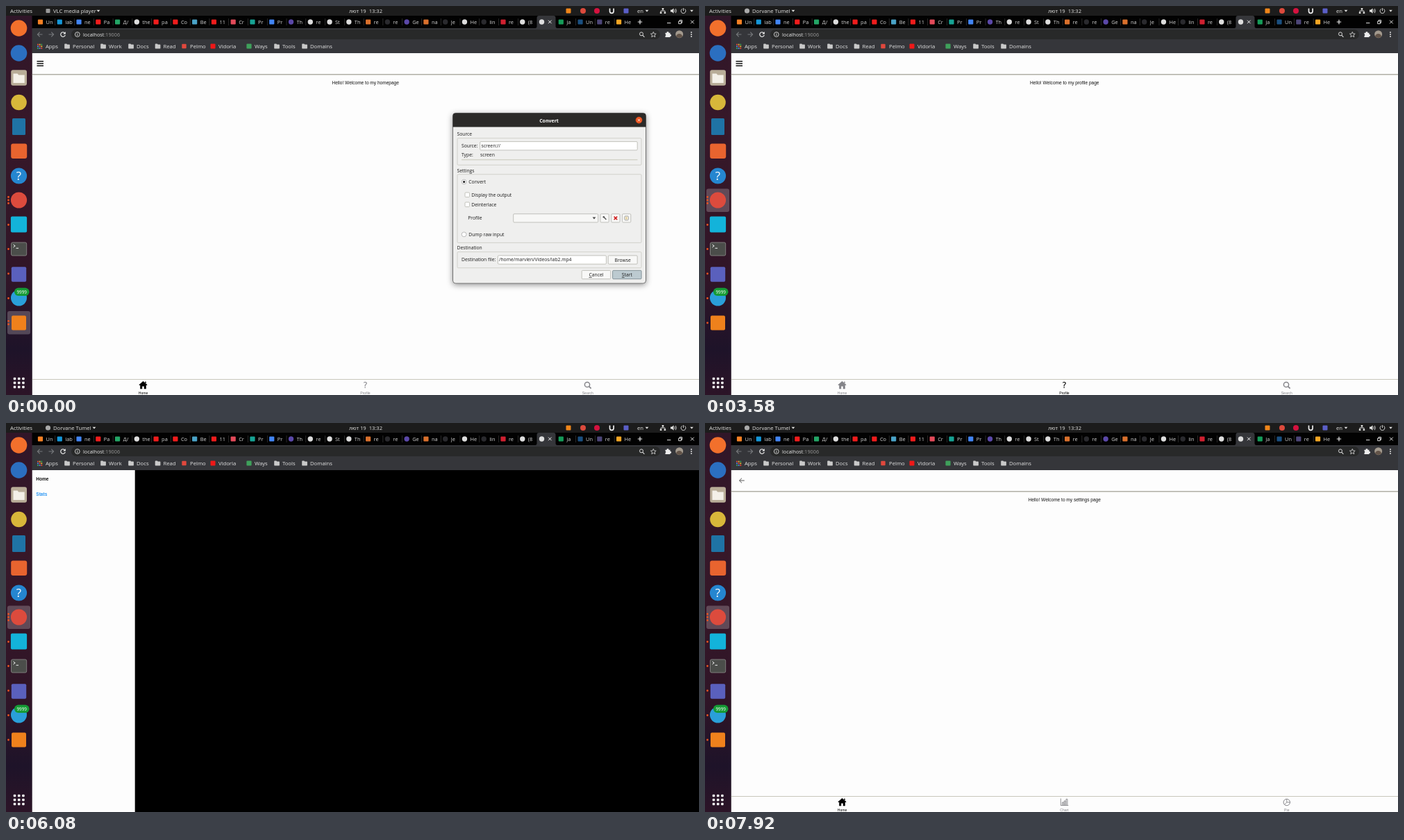
An HTML page that plays this animation: 998 px wide and 561 px high, repeating every 8000 ms.

```html
<!DOCTYPE html>
<html lang="en">
<head>
<meta charset="utf-8">
<title>Tab and drawer navigation</title>
<style>
html, body { margin: 0; width: 100%; height: 100%; overflow: hidden; background: #000; }
svg { display: block; width: 100vw; height: 100vh; }
svg svg { width: auto; height: auto; }
text { font-family: "Open Sans", "Noto Sans", sans-serif; white-space: pre; }
.web text { font-family: "Liberation Sans", Arial, sans-serif; }
</style>
</head>
<body>
<svg id="stage" viewBox="0 0 998 561" preserveAspectRatio="none"></svg>
<script>
const LOOP = 8000;
const FRAME = 1000 / 12;
const DRAWER_WIDTH = 148.2;

const rect = (x, y, w, h, fill, more = '') =>
  `<rect x="${x}" y="${y}" width="${w}" height="${h}" fill="${fill}" ${more}/>`;
const circle = (x, y, r, fill, more = '') =>
  `<circle cx="${x}" cy="${y}" r="${r}" fill="${fill}" ${more}/>`;
const line = (d, color, width = 1, more = '') =>
  `<path d="${d}" fill="none" stroke="${color}" stroke-width="${width}" ${more}/>`;
const shape = (d, fill) => `<path d="${d}" fill="${fill}"/>`;
const text = (x, y, value, size, fill, more = '') =>
  `<text x="${x}" y="${y}" font-size="${size}" fill="${fill}" ${more}>${value}</text>`;
const group = (id, body, more = '') => `<g id="${id}" ${more}>${body}</g>`;
const square = (x, y, r, fill, round = 1) =>
  rect(x - r, y - r, 2 * r, 2 * r, fill, `rx="${round}"`);
const caret = (x, y, fill) => shape(`M${x - 2.4} ${y - 1.2}h4.8l-2.4 2.8z`, fill);
const MIDDLE = 'text-anchor="middle"';
const BOLD = 'font-weight="700"';

function topBar() {
  const light = '#e4e4e2';
  return rect(0, 0, 998, 14, '#1c1c1c')
    + text(6, 9.8, 'Activities', 7.8, light)
    + group('vlcTitle', square(60.5, 7, 3, '#999') + text(68, 9.8, 'VLC media player', 7.7, light) + caret(133, 7, light))
    + group('browserTitle', circle(60.5, 7, 3.6, '#aaa') + text(68, 9.8, 'Dorvane Tumel', 7.7, light) + caret(127, 7, light))
    + text(518, 9.8, 'лют 19  13:32', 7.6, light, MIDDLE)
    + square(810, 7, 3.5, '#f0861a') + circle(831, 7, 4, '#dc4a3c') + circle(851, 7, 4, '#d5123f')
    + line('M869.5 3.5v4a2.8 2.8 0 0 0 5.6 0v-4', '#eee', 1.7) + square(893, 7, 3.5, '#5b5fc7')
    + text(909, 9.8, 'en', 7.7, light) + caret(923, 7, light)
    + line('M946 4v3M943 10V7h6v3', light, .9)
    + rect(944.7, 3, 2.6, 2.2, light) + rect(941.8, 8.7, 2.6, 2.2, light) + rect(947.6, 8.7, 2.6, 2.2, light)
    + shape('M957 5.6h2l2.5-2.4v7.6l-2.5-2.4h-2z', light) + line('M962.8 5q1.5 2 0 4M964.3 3.8q2.4 3.2 0 6.4', light, .8)
    + line('M973.8 4.2a3.4 3.4 0 1 0 3.4 0M975.5 3v4', light, .9) + caret(987.5, 7, light);
}

function tabStrip() {
  const red = '#f01c1c', docs = '#4285f4', violet = '#5b48a8', white = '#ddd', orange = '#d9702c', dark = '#2a2a2e';
  const tabs = [
    ['Un', '#f48024'], ['lab', '#1496d8'], ['ne', docs], ['Pa', red], ['Д/', '#23a566'], ['the', white], ['pa', red],
    ['Co', red], ['Be', '#4aa3c8'], ['11', red], ['Cr', '#e34a5a'], ['Pr', '#16a394'], ['Pr', docs], ['Th', violet],
    ['re', white], ['St', white], ['Th', white], ['re', orange], ['re', dark], ['Ge', violet], ['na', orange],
    ['Je', dark], ['He', white], ['lin', dark], ['re', '#d02030'], ['(8', white], ['', white],
    ['Ja', '#159b58'], ['Un', '#1a4f80'], ['re', '#4d4678'], ['He', '#f5a623'],
  ];
  const isRound = color => [white, violet, dark].includes(color);
  let out = rect(37, 14, 961, 18, '#020202')
    + '<path d="M762 32q2.5 0 2.5-3V17q0-3 3-3h21q3 0 3 3v12q0 3 2.5 3z" fill="#35363a"/>';
  tabs.forEach(([label, color], i) => {
    const x = 49.5 + i * 27.77;
    out += isRound(color) ? circle(x, 23, 3.7, color) : square(x, 23, 3.6, color);
    if (!label) return;
    out += `<svg x="${x + 8}" y="14" width="12.5" height="18" style="width:12.5px;height:18px">`
      + text(0, 11.6, label, 7.4, '#d6d6d6') + '</svg>';
    if (tabs[i + 1]?.[0]) out += rect(x + 21, 18, .6, 10, '#444');
  });
  return out + line('M781 20.6l4.6 4.6m0-4.6l-4.6 4.6', '#eee', 1)
    + line('M909.8 23h6.4M913 19.8v6.4', '#eee', 1.2)
    + line('M952 24.5h5.4M968.7 22h3.6v3.6h-3.6zM970 21.8v-1.4h3.6v3.8h-1.2M986 20.6l4.8 4.8m0-4.8l-4.8 4.8', '#ddd', 1);
}

function toolbar() {
  const folder = x => shape(`M${x - 3.8} 55.2q0-.7.7-.7h2.4l1 1h2.9q.7 0 .7.7v4.6q0 .7-.7.7h-6.3q-.7 0-.7-.7z`, '#c9c9c9');
  const label = (x, value) => text(x, 60.8, value, 7.7, '#e4e4e4');
  const folders = [[88, 'Personal'], [140, 'Work'], [180, 'Docs'], [218.5, 'Read'], [390, 'Tools'], [430, 'Domains']];
  let apps = '';
  const hues = ['#e8453c', '#f9bb2d', '#3aa757', '#4688f1'];
  for (let i = 0; i < 9; i++) apps += rect(45 + i % 3 * 2.7, 54.7 + (i / 3 | 0) * 2.7, 1.8, 1.8, hues[i % 4]);
  return rect(37, 32, 961, 36, '#35363a') + rect(94, 34, 848, 14, '#282929', 'rx="7"')
    + line('M52.5 41h-7m3.2-3.3L45.4 41l3.3 3.3M61.5 41h7m-3.2-3.3l3.3 3.3-3.3 3.3', '#77797c', 1.1)
    + line('M84.8 39.2a3.3 3.3 0 1 0 .5 2.6', '#eee', 1.2) + shape('M85.8 37v3.4h-3.4z', '#eee')
    + circle(102.8, 41, 3.4, 'none', 'stroke="#ddd" stroke-width=".9"') + line('M102.8 40.3v2.7M102.8 38.7v.9', '#ddd', .9)
    + text(111, 43.7, 'localhost<tspan fill="#9a9a9a">:19006</tspan>', 7.25, '#eee')
    + circle(915, 40.3, 2.5, 'none', 'stroke="#ddd"') + line('M916.8 42.2l2.6 2.6', '#ddd', 1.1)
    + line('M932.3 37.3l1.1 2.6 2.8.2-2.1 1.8.7 2.8-2.5-1.5-2.5 1.5.7-2.8-2.1-1.8 2.8-.2z', '#ddd', .8)
    + shape('M949.5 38.8h2.2a1.4 1.4 0 1 1 2.6 0h2.2v2.3a1.3 1.3 0 1 1 0 2.5V45h-7v-2a1.3 1.3 0 0 0 0-2.4z', '#eee')
    + circle(969.7, 40.7, 5.5, '#a39a8e') + shape('M965 44q1-4 4.6-4t4.6 4q-4.6 4.2-9.2 0z', '#625348')
    + [38, 41, 44].map(y => circle(987, y, .9, '#eee')).join('')
    + apps + label(57, 'Apps') + folders.map(([x, name]) => folder(x) + label(x + 8, name)).join('')
    + square(256.5, 58, 3.2, '#e0483d') + label(265, 'Pelmo')
    + square(298, 58, 3.5, '#f01818') + label(306, 'Vidorla')
    + square(350, 58, 3.6, '#3fa15b') + label(358, 'Ways');
}

function dock() {
  const x = 18.5;
  const dots = (...ys) => ys.map(y => circle(3.5, y, 1.4, '#e95420')).join('');
  const highlight = (id, y) => group(id, rect(2, y, 33, 33.5, '#fff', 'rx="3" opacity=".22"'));
  let grid = '';
  for (let i = 0; i < 9; i++) grid += rect(10.7 + i % 3 * 6.2, 535.7 + (i / 3 | 0) * 6, 3.6, 3.6, '#f2f2f2', 'rx="1"');
  return rect(0, 14, 37.5, 547, 'url(#dockFill)')
    + highlight('browserLit', 263.5) + highlight('vlcLit', 440)
    + circle(x, 32, 11.8, '#f2702c') + circle(x, 68, 11.8, '#2b6fc0')
    + rect(7.2, 92.3, 22.8, 22.4, '#b9ad98', 'rx="3"')
    + shape('M10.5 97.5h6l1.7 2h8.5v11.5H10.5z', '#f4f0e8')
    + circle(x, 139, 11.3, '#d8b73a')
    + rect(9, 162, 19, 24, '#1f73a5', 'rx="1.5"') + rect(7.2, 198.5, 23, 21.5, '#e8642f', 'rx="3"')
    + circle(x, 245, 11.6, '#2586d0') + text(x, 251, '?', 17, '#fff', MIDDLE)
    + circle(x, 280, 11.6, '#dc4b3d') + square(x, 315, 11.6, '#13b3da', 2)
    + rect(7.5, 341, 22.2, 19, '#4b4d4a', 'rx="2" stroke="#8f8f8c" stroke-width=".8"')
    + line('M10.5 344l2.7 2-2.7 2M14.5 349.3h3.5', '#eee', 1)
    + square(x, 387, 10.7, '#5a60bd', 2)
    + circle(x, 421, 11.5, '#2a9fd9') + rect(12, 406.5, 21.5, 11.5, '#159a35', 'rx="5.7"')
    + text(22.7, 414.6, '9999', 6.4, '#fff', MIDDLE)
    + square(x, 457, 10.5, '#ef811c', 2)
    + dots(275.5, 280, 284.5, 315.5, 350.5, 386, 421.5)
    + group('vlcTwoDots', dots(454.3, 459)) + group('vlcOneDot', dots(457)) + grid;
}

// Bottom navigation icons inherit their colour from the tab.
const icons = {
  home: x => shape(`M${x} 541l6 5.3-.8.9-.9-.7v5.7h-3v-3.7h-2.6v3.7h-3v-5.7l-.9.7-.8-.9zM${x + 2.5} 541.8h1.7v2.4l-1.7-1.4z`, 'currentColor'),
  help: x => `<text x="${x}" y="551.3" font-size="12" fill="currentColor" text-anchor="middle" style="font-family:'DejaVu Sans',sans-serif">?</text>`,
  search: x => circle(x - .8, 546, 3.6, 'none', 'stroke="currentColor" stroke-width="1.5"') + line(`M${x + 1.8} 548.6l3 3`, 'currentColor', 1.7),
  chart: x => line(`M${x - 5.2} 541.5v10h11M${x - 3} 551v-4h1.8v4M${x - .3} 551v-6h1.8v6M${x + 2.5} 551v-8.6h1.9v8.6`, 'currentColor', .9),
  pie: x => circle(x, 547, 4.7, 'none', 'stroke="currentColor"') + line(`M${x} 542.3v4.7h4.7M${x} 547l-3.3 3.3`, 'currentColor', .9),
};
const tab = (id, x, icon, label) =>
  group(id, icons[icon](x) + text(x, 559.5, label, 5.1, 'currentColor', MIDDLE));

function page() {
  const hellos = ['homepage', 'profile page', 'search page', 'settings page'];
  const drawer = rect(37.5, 68, DRAWER_WIDTH, 493, '#fdfdfd')
    + rect(37.5, 68, DRAWER_WIDTH, 24, '#f4f4f3', 'id="band"')
    + text(43.3, 83, 'Home', 6.55, '#111', BOLD) + text(43.3, 105.3, 'Stats', 6.55, '#2a96f3', BOLD + ' id="stats"');
  return rect(37.5, 68, 960.5, 493, '#fdfdfd')
    + rect(37.5, 98, 960.5, 1, '#aaa99f') + rect(37.5, 99, 960.5, 1.2, '#dededa')
    + line('M44.5 79.8h9.5m-9.5 3.2h9.5m-9.5 3.2h9.5', '#111', 1.4, 'id="menu"')
    + line('M56.8 83h-7.2m3.4-3.4L49.5 83l3.5 3.4', '#444', .9, 'id="back"')
    + hellos.map((end, i) => group('hello' + i, text(517.7, 113.2, 'Hello! Welcome to my ' + end, 6.55, '#111', MIDDLE))).join('')
    + rect(37.5, 538, 960.5, .9, '#c2c1b4')
    + tab('homeTab', 197.5, 'home', 'Home')
    + group('mainTabs', tab('profileTab', 517.5, 'help', 'Profile') + tab('searchTab', 837.8, 'search', 'Search'))
    + group('statsTabs', tab('chartTab', 517.5, 'chart', 'Chart') + tab('pieTab', 837.8, 'pie', 'Pie'), 'color="#85858a"')
    + rect(37.5, 68, 960.5, 493, '#000', 'id="shade"') + group('drawer', drawer);
}

function dialog() {
  const ink = '#1c1c1c';
  const label = (x, y, value, more) => text(x, y, value, 6.75, ink, more);
  const frame = (x, y, w, h, fill = 'none', edge = '#c9c9c2', r = 1.2) =>
    rect(x, y, w, h, fill, `rx="${r}" stroke="${edge}" stroke-width=".8"`);
  const field = (x, y, w) => frame(x, y, w, 12.3, '#fff', '#b5b5ad');
  const button = (x, y, w, value, fill = '#f8f8f7', edge = '#b3b3ac') =>
    frame(x, y, w, 12.3, fill, edge) + label(x + w / 2, y + 8.6, value, MIDDLE);
  const under = (first, rest) => `<tspan text-decoration="underline">${first}</tspan>${rest}`;
  const radio = y => circle(659.6, y, 3.4, '#fff', 'stroke="#aaa" stroke-width=".8"');
  const body = rect(643.5, 154.5, 278, 245.5, '#efefee', 'rx="4" stroke="#555" stroke-width=".8"');
  return `<g filter="url(#shadow)">${body}</g>`
    + shape('M643.5 174.5v-16q0-4 4-4h270q4 0 4 4v16z', '#2b2a28')
    + text(782, 167.5, 'Convert', 7, '#fff', MIDDLE + ' ' + BOLD)
    + circle(911.5, 164.6, 4.8, '#e95420') + line('M909.8 162.9l3.4 3.4m0-3.4l-3.4 3.4', '#fff', .9)
    + label(649.5, 187, 'Source') + frame(650, 190.7, 265, 38.6)
    + label(656, 204.2, 'Source:') + field(682.7, 195.6, 226.5) + label(684.5, 204.2, 'screen://')
    + label(656, 217.2, 'Type:') + label(683, 217.2, 'screen') + line('M656 221.8h253.5', '#c5c4b4', .9)
    + label(649.5, 239.6, 'Settings') + frame(650, 242.8, 265, 98.6)
    + radio(253.6) + circle(659.6, 253.6, 1.6, '#222') + label(666.3, 256, 'Convert')
    + frame(661, 269, 6.6, 6.6, '#fff', '#b5b5ad') + label(670.3, 274.8, 'Display the output')
    + frame(661, 283, 6.6, 6.6, '#fff', '#b5b5ad') + label(670.3, 288.8, 'Deinterlace')
    + label(665.3, 308.2, 'Profile') + frame(730.7, 299.8, 122, 12.2, '#f7f7f6', '#b3b3ac') + caret(847, 305.8, '#444')
    + [856, 871.8, 887.6].map(x => frame(x, 299.8, 12.2, 12.2, '#f8f8f7', '#b3b3ac')).join('')
    + line('M860.8 304.3l3.6 3.8', '#555', 1.4) + circle(860.8, 304.2, 1.3, '#555')
    + line('M875.6 303.6l4.6 4.6m0-4.6l-4.6 4.6', '#d01818', 1.5)
    + frame(890.8, 303, 5.6, 5.8, '#fffdf0', '#888') + line('M892 305h3m-3 1.8h3', '#c09a40', .7)
    + radio(329.4) + label(666.3, 331.9, 'Dump raw input')
    + label(649.5, 351.3, 'Destination') + frame(650, 354.7, 265, 23)
    + label(656, 368.4, 'Destination file:') + field(708.4, 359.9, 156) + label(710, 368.4, '/home/marvlen/Videos/lab2.mp4')
    + button(867.2, 359.9, 42, 'Browse')
    + button(829.2, 381.4, 41.5, under('C', 'ancel')) + button(873.6, 381.4, 41.5, under('S', 'tart'), '#bccad0', '#71828a');
}

document.getElementById('stage').innerHTML = `<defs>
  <linearGradient id="dockFill" x1="0" y1="0" x2="0" y2="1">
    <stop offset="0" stop-color="#301628"/><stop offset=".3" stop-color="#371829"/>
    <stop offset=".7" stop-color="#301527"/><stop offset=".88" stop-color="#1e1329"/><stop offset="1" stop-color="#2c1427"/>
  </linearGradient>
  <filter id="shadow" x="-10%" y="-10%" width="120%" height="120%">
    <feDropShadow dx="0" dy="2" stdDeviation="4" flood-opacity=".42"/>
  </filter></defs>`
  + group('web', page(), 'class="web"') + tabStrip() + toolbar() + topBar() + dock() + group('dialog', dialog());

const el = {};
document.querySelectorAll('[id]').forEach(node => { el[node.id] = node; });
const show = (id, on) => el[id].setAttribute('visibility', on ? 'visible' : 'hidden');
const fade = (id, value) => el[id].setAttribute('opacity', value);

function track(steps, t) {
  const i = steps.findIndex(([time]) => time > t);
  if (i === 0) return steps[0][1];
  if (i < 0) return steps[steps.length - 1][1];
  const [t0, a] = steps[i - 1], [t1, b] = steps[i];
  return a + (b - a) * (t - t0) / (t1 - t0);
}

const motion = {
  drawer: [[5640, 0], [5750, .46], [5830, .787], [5920, .94], [6050, 1], [7260, 1], [7350, .6], [7440, .22], [7540, .05], [7640, 0]],
  menu: [[5420, 1], [5570, .25], [5700, .25], [5850, 1]],
  stats: [[7060, 1], [7160, .25], [7280, .25], [7400, 1]],
  band: [[5900, 1], [6080, 0]],
};
const pageStarts = [0, 2920, 4580, 7260];

function heldTime(now) {
  const index = Math.floor((now % LOOP + 4) / FRAME);
  return Math.round(index * FRAME / 10) * 10 % LOOP;
}

function draw(now) {
  const t = heldTime(now);
  const converting = t < 400;
  ['dialog', 'vlcTitle', 'vlcLit', 'vlcTwoDots'].forEach(id => show(id, converting));
  ['browserTitle', 'browserLit', 'vlcOneDot'].forEach(id => show(id, !converting));

  const current = pageStarts.filter(start => start <= t).length - 1;
  const inStats = current === 3;
  pageStarts.forEach((_, i) => show('hello' + i, i === current));
  ['homeTab', 'profileTab', 'searchTab'].forEach((id, i) =>
    el[id].setAttribute('color', i === current % 3 ? '#000' : '#85858a'));
  show('mainTabs', !inStats);
  show('statsTabs', inStats);
  show('menu', !inStats);
  show('back', inStats);

  const open = track(motion.drawer, t);
  fade('shade', open);
  show('drawer', open > 0);
  el.drawer.setAttribute('transform', `translate(${DRAWER_WIDTH * (open - 1)} 0)`);
  ['menu', 'stats', 'band'].forEach(id => fade(id, track(motion[id], t)));
}

const start = performance.now();
function tick() {
  draw(performance.now() - start);
  requestAnimationFrame(tick);
}
tick();
</script>
</body>
</html>
```
